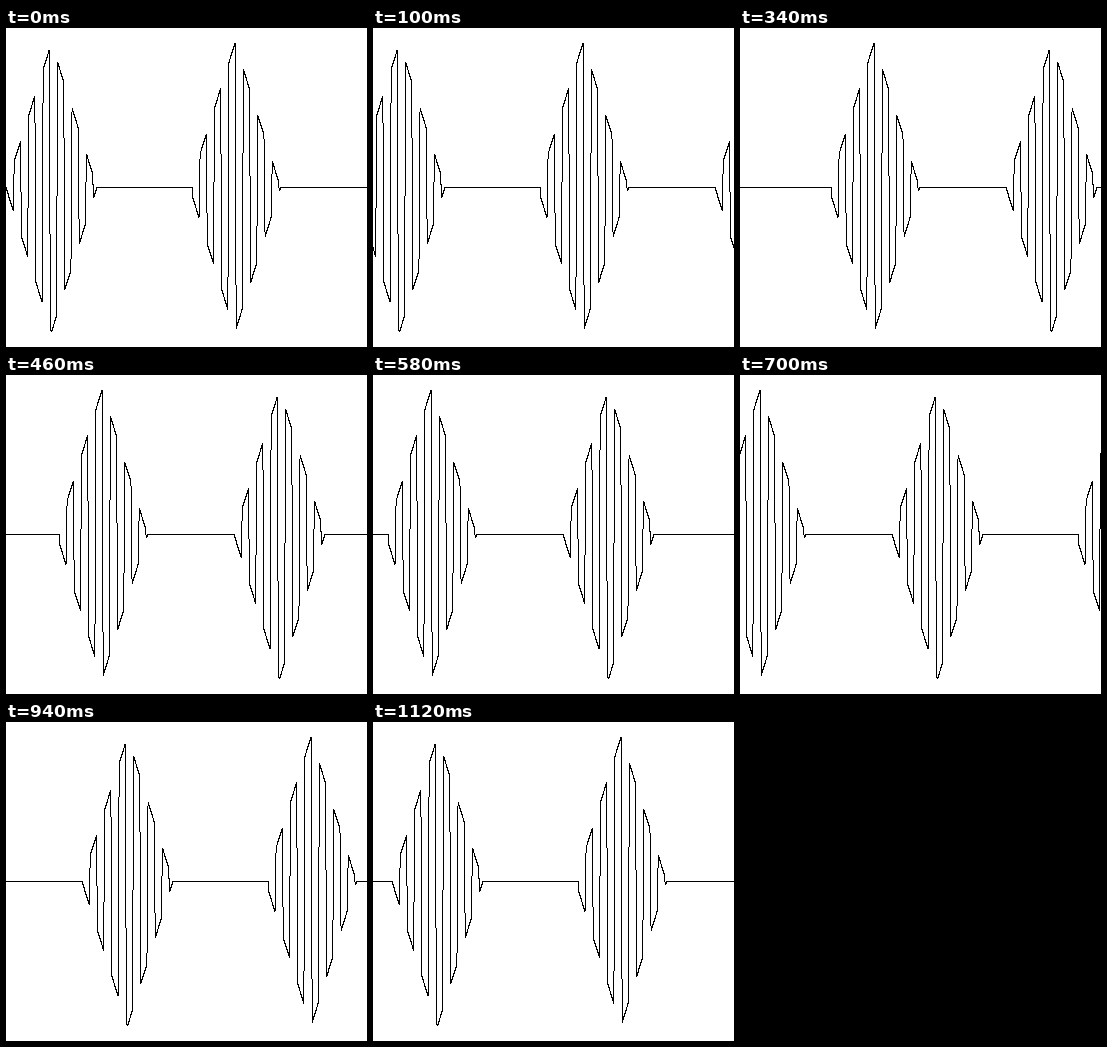
Recreate the animation shown at these times as an HTML page with a canvas. Size 361 px wide and 319 px high, loop 1180 ms.

```html
<!DOCTYPE html>
<html>
<head>
<meta charset="utf-8">
<title>Travelling wave packets</title>
<style>
html, body { margin: 0; width: 361px; height: 319px; overflow: hidden; background: #fff; }
canvas { display: block; }
</style>
</head>
<body>
<canvas id="stage" width="361" height="319"></canvas>
<script>
const W = 361, H = 319, STEP = 19;
const BASE = 159, AMP = 144.5, REACH = 45.5; // triangular envelope
const HALF = 7.22, EDGE = 0.55;              // carrier half period, half width of a flip
const packets = [{ start: 0, peak: 45 }, { start: 185.8, peak: 228.5 }];

const ctx = document.getElementById('stage').getContext('2d');
const tile = document.createElement('canvas');
tile.width = W;
tile.height = H;
const pen = tile.getContext('2d');

// Steep-edged square carrier inside a triangular envelope.
function wave(x) {
  const { start, peak } = packets[x < packets[1].start ? 0 : 1];
  const envelope = Math.max(0, AMP * (1 - Math.abs(x - peak) / REACH));
  const phase = (x - start) / HALF, flip = Math.round(phase);
  const edge = Math.max(-1, Math.min(1, (phase - flip) * HALF / EDGE));
  return BASE + envelope * edge * (flip % 2 ? -1 : 1);
}

// Hard-edged line, one pixel wide.
function line(x0, y0, x1, y1) {
  const n = Math.ceil(Math.max(Math.abs(x1 - x0), Math.abs(y1 - y0)));
  for (let i = 0; i <= n; i++) {
    const k = n ? i / n : 0;
    pen.fillRect(Math.round(x0 + (x1 - x0) * k), Math.round(y0 + (y1 - y0) * k), 1, 1);
  }
}

const dx = 0.05;
for (let x = 0; x < W; x += dx) line(x, wave(x), x + dx, wave(x + dx));

const start = performance.now();

function draw(now) {
  const t = Math.max(0, now - start) % 1180;
  // The first pose lasts 100 ms, the others 60 ms.
  const shift = STEP * Math.max(0, Math.floor((t - 40) / 60));
  ctx.fillStyle = '#fff';
  ctx.fillRect(0, 0, W, H);
  ctx.drawImage(tile, -shift, 0);
  ctx.drawImage(tile, W - shift, 0);
  requestAnimationFrame(draw);
}
draw(start);
</script>
</body>
</html>
```
